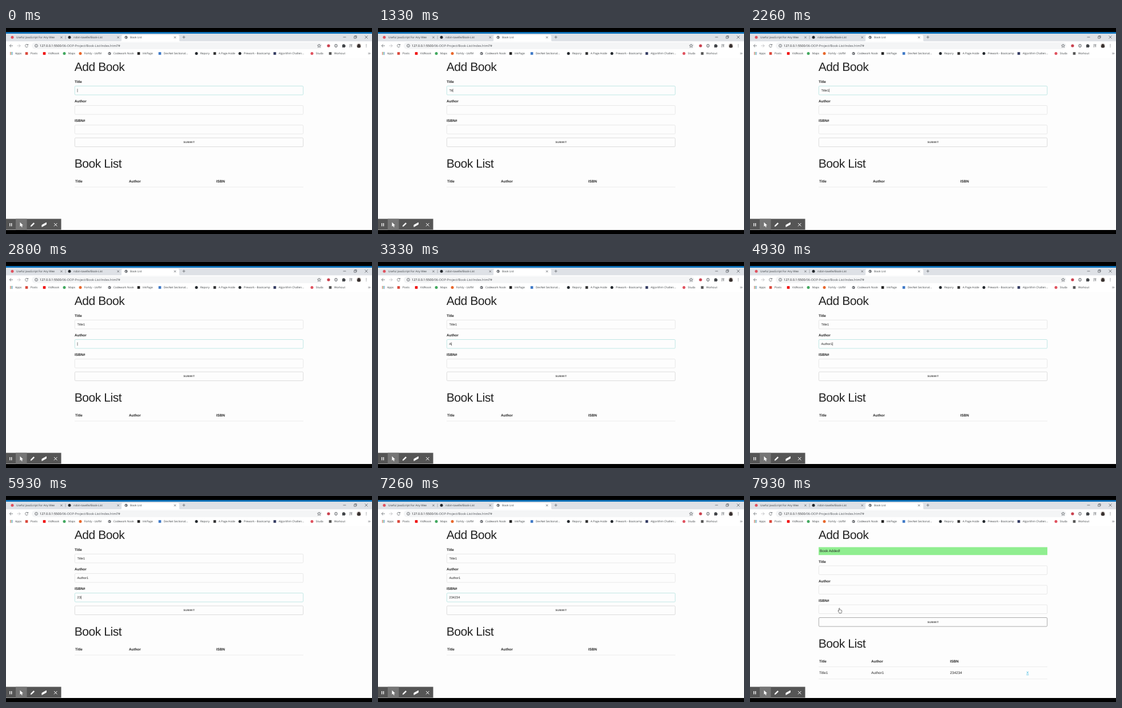
Recreate the animation shown at these times as an HTML page. Size 640 px wide and 360 px high, loop 8 s.

```html
<!DOCTYPE html>
<html lang="en">
<head>
<meta charset="utf-8">
<title>Book List</title>
<style>
  html, body { margin: 0; width: 100%; height: 100%; overflow: hidden; background: #000; }
  svg { display: block; width: 100vw; height: 100vh; text-rendering: geometricPrecision; }
  text { font-family: "Liberation Sans", Arial, sans-serif; font-size: 6.3px; fill: #222; white-space: pre; }
  .ui text { font-family: "Open Sans", "Noto Sans", sans-serif; font-size: 4.85px; fill: #3c4043; }
  .ui .url { font-size: 5.55px; fill: #202124; }
  .url .path { fill: #4d5156; }
  .line { fill: none; stroke: #5f6368; stroke-width: .8; }
  .h1 { font-size: 21px; letter-spacing: -.42px; }
  .bold { font-weight: bold; }
  .box { fill: #fdfdfd; stroke: #e0e0e0; stroke-width: .7; }
  .box.focus { stroke: #a6dedb; }
  .value { font-size: 5.6px; }
  .submit { font-size: 4.6px; font-weight: bold; letter-spacing: .42px; text-anchor: middle; fill: #444; }
  .button { fill: #fdfdfd; stroke: #cfcfcf; stroke-width: .7; }
  .hover .button { stroke: #888; }
  .rule { stroke: #e6e6e6; stroke-width: .7; }
</style>
</head>
<body>
<svg viewBox="0 0 640 360">
  <rect width="640" height="360"/>
  <rect y="10" width="640" height="343" fill="#fdfdfd"/>

  <g class="ui">
    <rect y="10" width="640" height="13.5" fill="#dee1e6"/>
    <rect y="7" width="640" height="3" fill="#1074bc"/>
    <path d="M200 23.5q2 0 2-2v-7q0-2.5 2.5-2.5h96q2.500 0 2.500 2.500v7q0 2 2 2z" fill="#fff"/>
    <rect y="23.5" width="640" height="28.500" fill="#fff"/>
    <path d="M104 13.500v6" class="line" stroke-opacity=".5"/>
    <g id="tabs"></g>
    <path class="line" d="M308.500 16h5M311 13.500v5M589.500 16h5M608.700 14.700h3.400v3.400h-3.400zM609.700 14.700v-1h3.400v3.400h-1M627.500 13.500l5 5m0-5l-5 5"/>

    <rect x="45" y="25" width="508" height="12" rx="6" fill="#f4f5f6"/>
    <path class="line" d="M12 31H6.500M9 28.300L6.300 31 9 33.700"/>
    <path class="line" d="M19.500 31H25M22.500 28.300L25.200 31l-2.700 2.700" stroke-opacity=".45"/>
    <path class="line" d="M38 29.500A2.500 2.500 0 1 0 38.400 31.800M38.500 28v2h-2"/>
    <circle class="line" cx="53" cy="31" r="2.500" stroke-width=".6"/>
    <path class="line" d="M53 30.700v1.600M53 29.400v.6"/>
    <text class="url" x="59" y="33">127.0.0.1:5500<tspan class="path">/06-OOP-Project/Book-List/index.html?#</tspan></text>
    <path class="line" stroke-width=".6" d="M547.500 28l.8 2 2.200.2-1.700 1.400.6 2.200-1.900-1.200-1.900 1.200.6-2.200-1.700-1.400 2.200-.2z"/>
    <circle cx="564" cy="31" r="2.600" fill="#c9424f"/>
    <circle class="line" cx="577" cy="31" r="2.600"/>
    <path class="line" d="M577 28.500v5"/>
    <path d="M588 29h1.500a1 1 0 0 1 2 0h1.500v1.500a1 1 0 0 1 0 2V34h-5z" fill="#44474b"/>
    <path class="line" d="M600.500 29h5M600.500 31h3M600.500 33h2M604.500 33.500v-4"/>
    <circle cx="617" cy="31" r="4" fill="#c9c2bd"/>
    <path d="M614 33.500q0-5.500 3-5.500t3 5.500q-3 2.200-6 0" fill="#37302f"/>
    <path d="M630 28.800v.1m0 2v.1m0 2v.1" stroke="#5f6368" stroke-width="1.100" stroke-linecap="round"/>
    <path class="line" d="M633.500 43l1.300 1.500-1.300 1.500M635.500 43l1.300 1.500-1.300 1.500" stroke-width=".6"/>
    <g id="bookmarks"></g>
  </g>

  <text class="h1" x="119.700" y="75.400">Add Book</text>
  <g id="alert">
    <rect x="120" y="89.400" width="400" height="13.800" fill="#90ee90"/>
    <text x="122" y="98.400">Book Added!</text>
  </g>

  <g id="lower">
    <g id="fields"></g>
    <rect id="caret" width=".6" height="6" fill="#333"/>
    <rect class="button" x="120.300" y="192" width="399.400" height="15.500" rx="1.600"/>
    <text class="submit" x="320.200" y="201.400">SUBMIT</text>
    <text class="h1" x="119.700" y="244">Book List</text>
    <text class="bold" x="121" y="270">Title</text>
    <text class="bold" id="authorHead" y="270">Author</text>
    <text class="bold" id="isbnHead" y="270">ISBN</text>
    <path class="rule" d="M120 278H520"/>
    <g id="row">
      <text x="121" y="290.900">Title1</text>
      <text x="212" y="290.900">Author1</text>
      <text x="349.700" y="290.900">234234</text>
      <text x="483.300" y="290.900" style="fill:#1eaedb;text-decoration:underline">X</text>
      <path class="rule" d="M120 299.200H520"/>
    </g>
  </g>

  <rect y="333.500" width="96.500" height="19" fill="#555"/>
  <rect x="17" y="333.500" width="19.500" height="19" fill="#757575"/>
  <g fill="#fff" stroke="#fff">
    <path d="M6.800 341v5.500M9.700 341v5.500" stroke-width="1.300"/>
    <path d="M24.500 339.500v7.500l1.800-1.600 1.200 2.800 1.300-.6-1.200-2.700h2.400z" stroke="none"/>
    <path d="M43 347l.5-2 4.800-4.800 1.500 1.500-4.800 4.800z" stroke-width=".4"/>
    <path d="M62.800 344.300l7.700-4.300v3.200l-7.700 4.300z" stroke-width=".8" stroke-linejoin="round"/>
    <path d="M84 341l5.400 5.400m0-5.400l-5.400 5.400" stroke-width="1"/>
  </g>

  <path id="hand" d="M155.500 203.500l-1.700-3q.5-1 1.700.2v-4.200q.8-1.200 1.500 0v2.500q.8-.6 1.300.2.800-.5 1.200.3.800-.3 1 .6v2.600l-.8 2h-3.700z" fill="#fff" stroke="#222" stroke-width=".6"/>
</svg>

<script>
const LOOP = 8000;
const SUBMIT_AT = 7730;
const HOVER_AT = 7530;
const $ = id => document.getElementById(id);

const icon = (x, y, color, square) => square
  ? `<rect x="${x - 2.3}" y="${y - 2.3}" width="4.600" height="4.600" fill="${color}"/>`
  : `<circle cx="${x}" cy="${y}" r="2.500" fill="${color}"/>`;
const globe = (x, y) => icon(x, y, '#55595e') +
  `<path d="M${x - 1.6} ${y - 1}l1.400.4.300 1.300-1 1zM${x + .6} ${y - 1.6}l1 1.200-.8 1.200z" fill="#fff"/>`;

const tabs = [
  [11, 'Useful JavaScript For Any Wee', '#e0525f'],
  [111, 'robin-tavelle/Book-List', '#24292e'],
  [210, 'Book List']
];
$('tabs').innerHTML = tabs.map(([x, label, color], i) =>
  (color ? icon(x, 16.3, color) : globe(x, 16.3)) +
  `<text x="${x + 7}" y="18.200">${label}</text>` +
  `<path class="line" d="M${95.2 + 99.3 * i} 14.700l3.400 3.400m0-3.400l-3.400 3.400"/>`).join('');

const bookmarks = [
  [36, 'Posts', '#d9483b', true],
  [67, 'VidNook', '#f00000', true],
  [102, 'Maps', '#41a85f'],
  [130, 'Forkly - UofM', '#e8672b'],
  [181, 'Codework Nook'],
  [232, 'InkPage', '#222', true],
  [269, 'DevNet Sectional...', '#3d78c6', true],
  [333, 'Repory', '#24292e'],
  [365, 'A Page Aside', '#333', true],
  [409, 'Prework - Bootcamp', '#24292e'],
  [470, 'Algorithm Challen...', '#333b62', true],
  [535, 'Studa', '#e0525f'],
  [567, 'Workout', '#555', true]
];
let appDots = '';
for (let i = 0; i < 9; i++)
  appDots += `<rect x="${7 + i % 3 * 1.8}" y="${42 + (i / 3 | 0) * 1.8}" width="1.200" height="1.200" fill="${['#d9483b', '#41a85f', '#3d78c6'][i % 3]}"/>`;
$('bookmarks').innerHTML = appDots + '<text x="16" y="46.300">Apps</text>' +
  bookmarks.map(([x, label, color, square]) =>
    (color ? icon(x, 44.5, color, square) : globe(x, 44.5)) +
    `<text x="${x + 6.8}" y="46.300">${label}</text>`).join('');

// Each field gains focus at a time, then one character per key time.
const fields = [
  { label: 'Title', text: 'Title1', focus: -200, keys: [1000, 1130, 1260, 1460, 1600, 1800] },
  { label: 'Author', text: 'Author1', focus: 2330, keys: [3200, 3450, 3700, 3860, 4130, 4330, 4660] },
  { label: 'ISBN#', text: '234234', focus: 5000, keys: [5860, 5930, 6000, 6130, 6260, 6400] }
];
$('fields').innerHTML = fields.map(({ label }, i) => {
  const y = 101.4 + 34.1 * i;
  return `<text class="bold" x="120" y="${y - 5.3}">${label}</text>
    <rect class="box" x="120.300" y="${y}" width="399.400" height="15.500" rx="1.600"/>
    <text class="value" x="124.600" y="${y + 9.6}"></text>`;
}).join('');
const boxes = document.querySelectorAll('.box');
const values = document.querySelectorAll('.value');

const show = (id, on) => $(id).style.display = on ? '' : 'none';

function draw(t) {
  const added = t >= SUBMIT_AT;
  const active = added ? -1 : fields.filter(f => t >= f.focus).length - 1;
  let caretOn = false;

  fields.forEach(({ text, focus, keys }, i) => {
    const typed = keys.filter(k => t >= k);
    values[i].textContent = added ? '' : text.slice(0, typed.length);
    boxes[i].classList.toggle('focus', i === active);
    if (i !== active) return;
    const since = t - (typed.length ? typed[typed.length - 1] : focus);
    caretOn = since % 1060 < 530;
    $('caret').setAttribute('x', 124.7 + (typed.length ? values[i].getComputedTextLength() : 0));
    $('caret').setAttribute('y', 106.2 + 34.1 * i);
  });

  show('caret', caretOn);
  show('alert', added);
  show('row', added);
  show('hand', t >= HOVER_AT);
  $('lower').classList.toggle('hover', t >= HOVER_AT);
  $('lower').setAttribute('transform', `translate(0 ${added ? 20.5 : 0})`);
  $('authorHead').setAttribute('x', added ? 212 : 215);
  $('isbnHead').setAttribute('x', added ? 349.7 : 367.7);
}

function tick() {
  draw(performance.now() % LOOP);
  requestAnimationFrame(tick);
}
tick();
</script>
</body>
</html>
```
